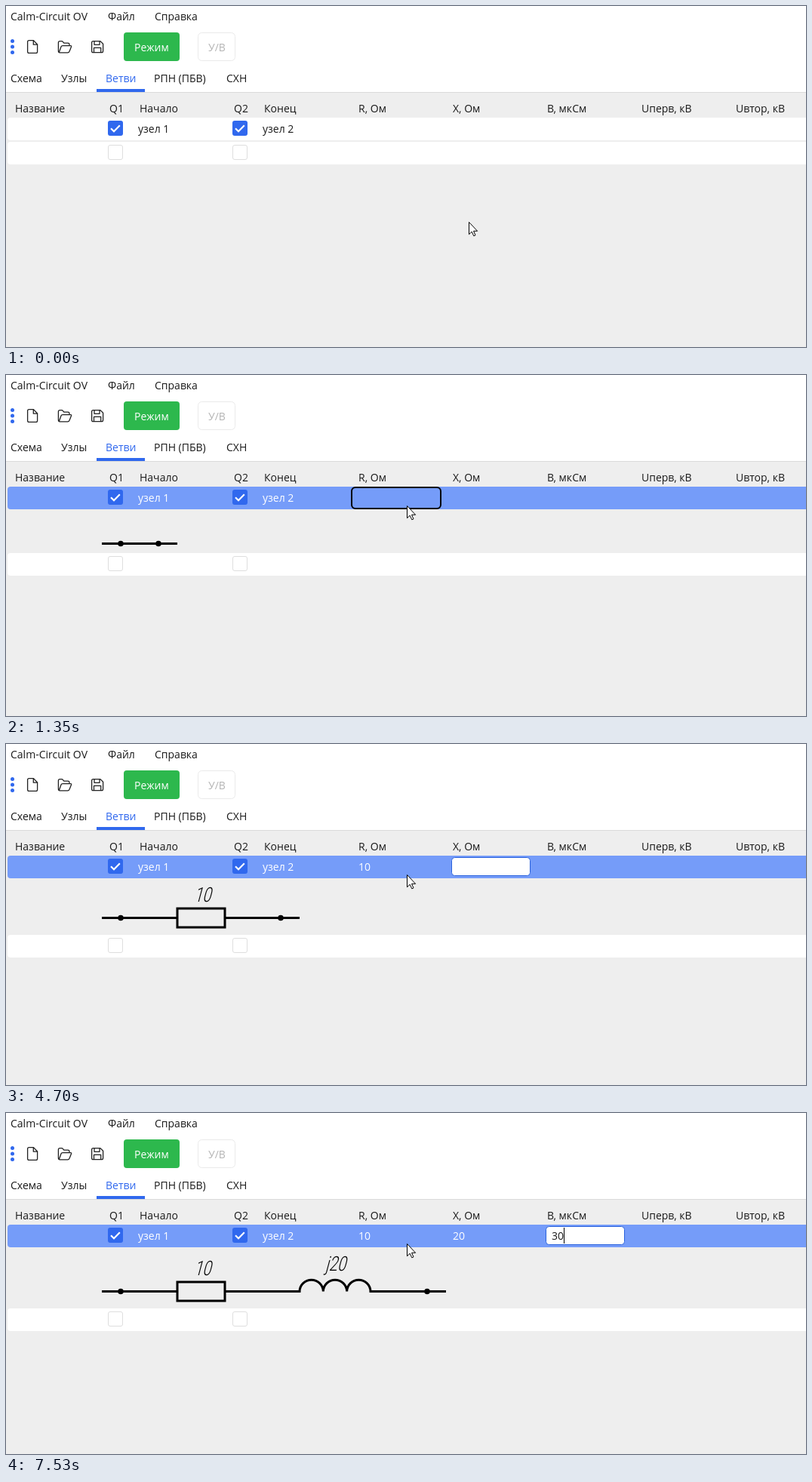
Write an HTML page that moves like this. It is 1060 by 452 pixels and loops after 8 s.

```html
<!DOCTYPE html>
<html lang="ru">
<head>
<meta charset="utf-8">
<title>Ветви</title>
<style>
  html, body { margin: 0; width: 100%; height: 100%; overflow: hidden; background: #fff; }
  svg { display: block; width: 1060px; height: 452px; }
  text { font: 14px "Open Sans", "Noto Sans", sans-serif; fill: #1b1b1b; white-space: pre; }
  .icon { fill: none; stroke: #222; stroke-width: 1.3; stroke-linejoin: round; }
  .wire { fill: none; stroke: #000; stroke-width: 3; }
  .label { font: 300 26.7px Roboto, "Open Sans", sans-serif; fill: #000; }
</style>
</head>
<body>
<svg viewBox="0 0 1060 452">
  <g id="chrome"></g>
  <g id="table"></g>
  <path id="cursor" d="M.5 .5V16.7L4.2 13.2 6.8 18.8 9 17.8 6.5 12.3H11.6Z" fill="#fff" stroke="#000" stroke-linejoin="round"/>
</svg>
<script>
const LOOP = 8000;
const BLUE = '#3068ee';
const COLS = [467, 592, 717];
const $ = id => document.getElementById(id);

const text = (x, y, s, fill = '#1b1b1b') => `<text x="${x}" y="${y}" style="fill:${fill}">${s}</text>`;
const rect = (x, y, w, h, r, fill, extra = '') =>
  `<rect x="${x}" y="${y}" width="${w}" height="${h}" rx="${r}" fill="${fill}" ${extra}/>`;
const dot = (x, y, r, fill = '#000') => `<circle cx="${x}" cy="${y}" r="${r}" fill="${fill}"/>`;
const line = (y, items) => items.map(([x, s, fill]) => text(x, y, s, fill)).join('');

function chrome() {
  return rect(0, 114, 1060, 338, 0, '#eee') + rect(0, 114, 1060, 1, 0, '#dadada') +
    line(19, [[6, 'Calm-Circuit OV'], [135, 'Файл'], [197, 'Справка']]) +
    [46.5, 54, 61.5].map(y => dot(8.5, y, 2.5, BLUE)).join('') +
    `<g class="icon">
      <path d="M30.5 45.6H36.5L41.6 51V60.5Q41.6 62.4 39.7 62.4H30.5Q28.6 62.4 28.6 60.5V47.5Q28.6 45.6 30.5 45.6ZM36.3 45.8V51.2H41.4"/>
      <path d="M69.4 60.5V48.5Q69.4 46.6 71.3 46.6H74.5L77 49.2H82Q83.9 49.2 83.9 51V52.6M70.3 61.5L73 54Q73.5 52.6 75 52.6H85.5Q87 52.6 86.5 54L84 60.3Q83.3 61.8 81.8 61.8H71Q69.4 61.8 69.4 60.3"/>
      <path d="M115.5 46.6H125L128.6 50.2V59.7Q128.6 61.6 126.7 61.6H115.5Q113.6 61.6 113.6 59.7V48.5Q113.6 46.6 115.5 46.6ZM117 46.8V51.3H124V46.8M116.5 61.4V55.3H125.7V61.4"/>
    </g>` +
    rect(156, 35, 74, 38, 4, '#2db84d') + text(170, 60, 'Режим', '#fff') +
    rect(254.5, 35.5, 49, 37, 5, '#fff', 'stroke="#eaeaea"') + text(268, 60, 'У/В', '#b4b4b4') +
    line(101, [[6, 'Схема'], [73, 'Узлы'], [132, 'Ветви', BLUE], [196, 'РПН (ПБВ)'], [292, 'СХН']]) +
    rect(120, 110, 64, 4, 0, BLUE) +
    line(141, [[12, 'Название'], [137, 'Q1'], [177, 'Начало'], [302, 'Q2'], [342, 'Конец'], [467, 'R, Ом'],
      [592, 'X, Ом'], [717, 'B, мкСм'], [842, 'Uперв, кВ'], [967, 'Uвтор, кВ']]);
}

function checkbox(x, y, on) {
  if (!on) return rect(x + .5, y + .5, 19, 19, 2.5, '#fff', 'stroke="#dedede"');
  return rect(x, y, 20, 20, 3, BLUE) +
    `<path d="M${x + 4} ${y + 10.3}l4 4 7.8-8" fill="none" stroke="#fff" stroke-width="2.2"/>`;
}

const row = (y, fill, on) =>
  rect(2, y, 1070, 30, 4, fill) + checkbox(135, y + 4, on) + checkbox(300, y + 4, on);

const label = (x, y, s) =>
  `<text class="label" style="fill:#000" transform="translate(${x} ${y}) skewX(-15) scale(.75 1)">${s}</text>`;

// Equivalent circuit: 0 = plain wire, 1 = resistor, 2 = resistor and coil
function circuit(stage) {
  const y = [223.5, 230.5, 236.5][stage], end = [227, 389, 583][stage];
  let path = `M127 ${y}H227`, out = '';
  if (stage > 0) {
    path += `M227 ${y - 12.5}h63v25h-63ZM290 ${y}H389`;
    out += label(249, y - 21.5, '10');
  }
  if (stage > 1) {
    path += 'a15.67 15.67 0 0 1 31.33 0'.repeat(3) + 'H583';
    out += label(423, y - 27.5, 'j20');
  }
  return `<path class="wire" d="${path}"/>` + dot(152, y, 3.8) + dot(end - 25, y, 3.8) + out;
}

function editor({ col, val, caret }) {
  const x = COLS[col];
  const cx = x + 5 + 8 * val.length + (caret === 1 ? 1 : 0);
  return rect(x - 1.5, 150.5, 104, 24, 4, '#fff', 'stroke="#2a62dc"') + text(x + 6, 168, val) +
    rect(cx, 152, caret, 21, 0, '#000');
}

// Each entry changes only the listed properties
const EVENTS = [
  [0, { sel: false, ring: false, stage: -1, col: -1, val: '', caret: 2, done: [], away: false }],
  [1310, { sel: true, ring: true }],
  [1350, { stage: 0 }],
  [3090, { ring: false, col: 0, val: '1' }],
  [3490, { val: '10', away: true }],
  [4100, { col: 1, val: '', done: ['10'], stage: 1 }],
  [4130, { away: false }],
  [4700, { caret: 0 }],
  [4930, { val: '2', caret: 2 }],
  [5330, { val: '20' }],
  [5900, { col: 2, val: '', done: ['10', '20'], stage: 2 }],
  [6470, { caret: 0 }],
  [7000, { val: '3', caret: 2 }],
  [7530, { val: '30', caret: 1 }]
];

function stateAt(t) {
  return Object.assign({}, ...EVENTS.filter(e => e[0] <= t).map(e => e[1]));
}

function pointerAt(t) {
  const step = Math.max(0, Math.min(18, Math.floor((t - 630) / 30) + 1)) / 18;
  const k = step * step * (3 - 2 * step);
  return [Math.round(613 - 82 * k), Math.round(286 - 113 * k)];
}

function table(s, py) {
  const hover = y => py >= y && py < y + 30 ? '#f5f5f5' : '#fff';
  const ink = s.sel ? '#fff' : '#1b1b1b';
  const nextY = s.stage < 0 ? 180 : [236, 253, 259][s.stage];
  return row(148, s.sel ? '#759cf9' : hover(148), true) +
    line(168, [[175, 'узел 1', ink], [340, 'узел 2', ink]]) +
    line(168, s.done.map((v, i) => [COLS[i], v, ink])) +
    (s.ring ? rect(458, 149, 118, 28, 5, 'none', 'stroke="#000" stroke-width="2"') : '') +
    (s.col < 0 ? '' : editor(s)) +
    (s.stage < 0 ? '' : circuit(s.stage)) +
    row(nextY, s.sel ? '#fff' : hover(180), false);
}

let last = '';
function draw(t) {
  const s = stateAt(t), [x, y] = pointerAt(t);
  const html = table(s, y);
  if (html !== last) $('table').innerHTML = last = html;
  $('cursor').setAttribute('transform', s.away ? 'translate(0 0)' : `translate(${x} ${y})`);
}

$('chrome').innerHTML = chrome();
const start = performance.now();
function tick() {
  draw((performance.now() - start) % LOOP);
  requestAnimationFrame(tick);
}
tick();
</script>
</body>
</html>
```
